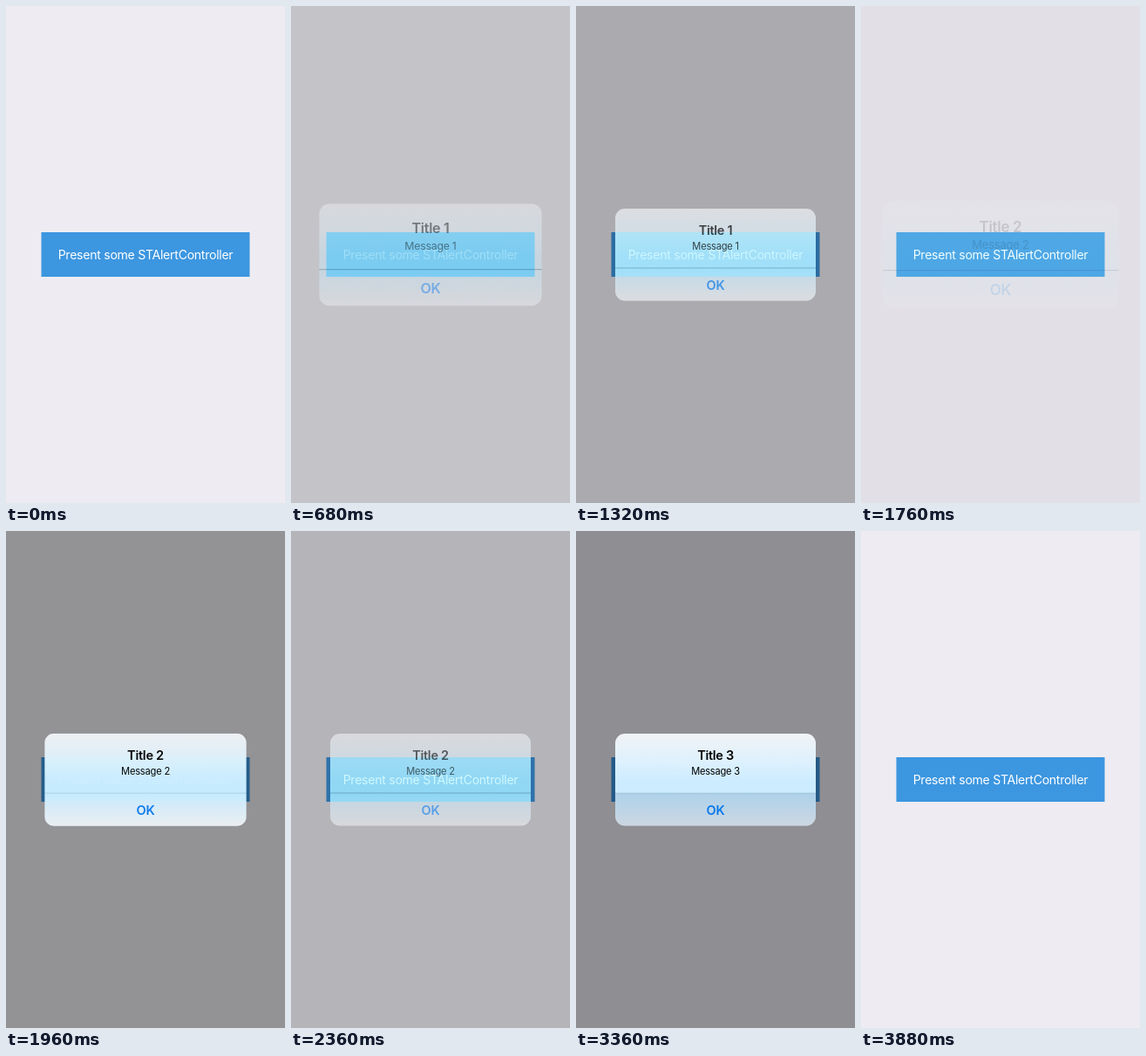
Animation of 320x569 px, one loop 3920 ms. Source, as an HTML page with a canvas:

```html
<!DOCTYPE html>
<html lang="en">
<head>
<meta charset="utf-8">
<title>Alert queue</title>
<style>
  html, body { margin: 0; width: 100%; height: 100%; overflow: hidden; background: #eeecf2; }
  canvas { display: block; width: 320px; height: 569px; }
</style>
</head>
<body>
<canvas id="stage" width="320" height="569"></canvas>
<script>
const ctx = document.getElementById('stage').getContext('2d');
const LOOP = 3920, STEP = 40;
const BUTTON = [40.5, 259, 239, 51];
const CENTER = { x: 160, y: 284.75 };

// Times in ms: alert appears, its OK is pressed, alert is dismissed
const alerts = [
  { show: 614, press: 1235, hide: 1273 },
  { show: 1733, press: 2260, hide: 2299 },
  { show: 2760, press: 3335, hide: 3400 },
];

const clamp = v => Math.min(1, Math.max(0, v));

// Critically damped spring from 0 to 1
function spring(ms) {
  const x = Math.max(0, ms) * 0.02285;
  return 1 - (1 + x) * Math.exp(-x);
}

function text(str, y, size, weight, color, alpha) {
  ctx.globalAlpha = alpha;
  ctx.fillStyle = color;
  ctx.font = `${weight} ${size}px Inter, sans-serif`;
  ctx.letterSpacing = `${-0.02 * size}px`;
  ctx.fillText(str, CENTER.x, y);
  ctx.globalAlpha = 1;
}

const glass = ctx.createLinearGradient(0, 232, 0, 338);
glass.addColorStop(0, 'rgb(241,243,246)');
glass.addColorStop(0.3, 'rgb(222,241,253)');
glass.addColorStop(0.5, 'rgb(205,236,255)');
glass.addColorStop(0.66, 'rgb(203,236,255)');
glass.addColorStop(1, 'rgb(239,242,245)');

function drawButton(t) {
  ctx.fillStyle = '#3c96e0';
  ctx.fillRect(...BUTTON);
  const pressed = clamp((t - 440) / 120) - clamp((t - 610) / 400);
  text('Present some STAlertController', 290, 14.1, 400, '#fff', 1 - 0.75 * pressed);
}

function drawAlert({ show, press, hide }, number, t) {
  const entered = spring(t - show);
  const alpha = entered * (1 - spring(t - hide));
  if (alpha < 0.002) return;
  const fading = alpha * (1 - alpha);

  ctx.fillStyle = `rgba(0,0,0,${0.4 * alpha})`;
  ctx.fillRect(0, 0, 320, 569);

  ctx.save();
  const scale = 1.2 - 0.2 * entered;
  ctx.translate(CENTER.x, CENTER.y);
  ctx.scale(scale, scale);
  ctx.translate(-CENTER.x, -CENTER.y);

  ctx.save();
  ctx.beginPath();
  ctx.roundRect(45, 232, 230, 105.5, 11);
  ctx.clip();
  ctx.globalAlpha = alpha;
  ctx.fillStyle = glass;
  ctx.fillRect(45, 232, 230, 106);
  if (t >= press && t < hide) {
    ctx.fillStyle = 'rgba(0,50,110,0.14)';
    ctx.fillRect(45, 300, 230, 38);
  }

  // The button glows through the glass while it fades
  ctx.setTransform(1, 0, 0, 1, 0, 0);
  ctx.globalCompositeOperation = 'lighter';
  ctx.globalAlpha = fading;
  ctx.fillStyle = 'rgb(20,120,100)';
  ctx.fillRect(...BUTTON);
  ctx.restore();

  ctx.fillStyle = `rgba(0,40,70,${0.15 * alpha + 1.1 * fading})`;
  ctx.fillRect(45, 299.6, 230, 0.8);
  text(`Title ${number}`, 262.4, 14.5, 600, '#000', alpha);
  text(`Message ${number}`, 279.2, 11.1, 400, '#000', alpha);
  text('OK', 324.5, 14.5, 600, '#0878ea', alpha);
  ctx.restore();
}

function frame(now) {
  const t = Math.floor((now % LOOP) / STEP) * STEP;
  ctx.fillStyle = '#eeecf2';
  ctx.fillRect(0, 0, 320, 569);
  ctx.textAlign = 'center';
  drawButton(t);
  alerts.forEach((alert, i) => drawAlert(alert, i + 1, t));
  requestAnimationFrame(() => frame(performance.now()));
}
frame(performance.now());
</script>
</body>
</html>
```
